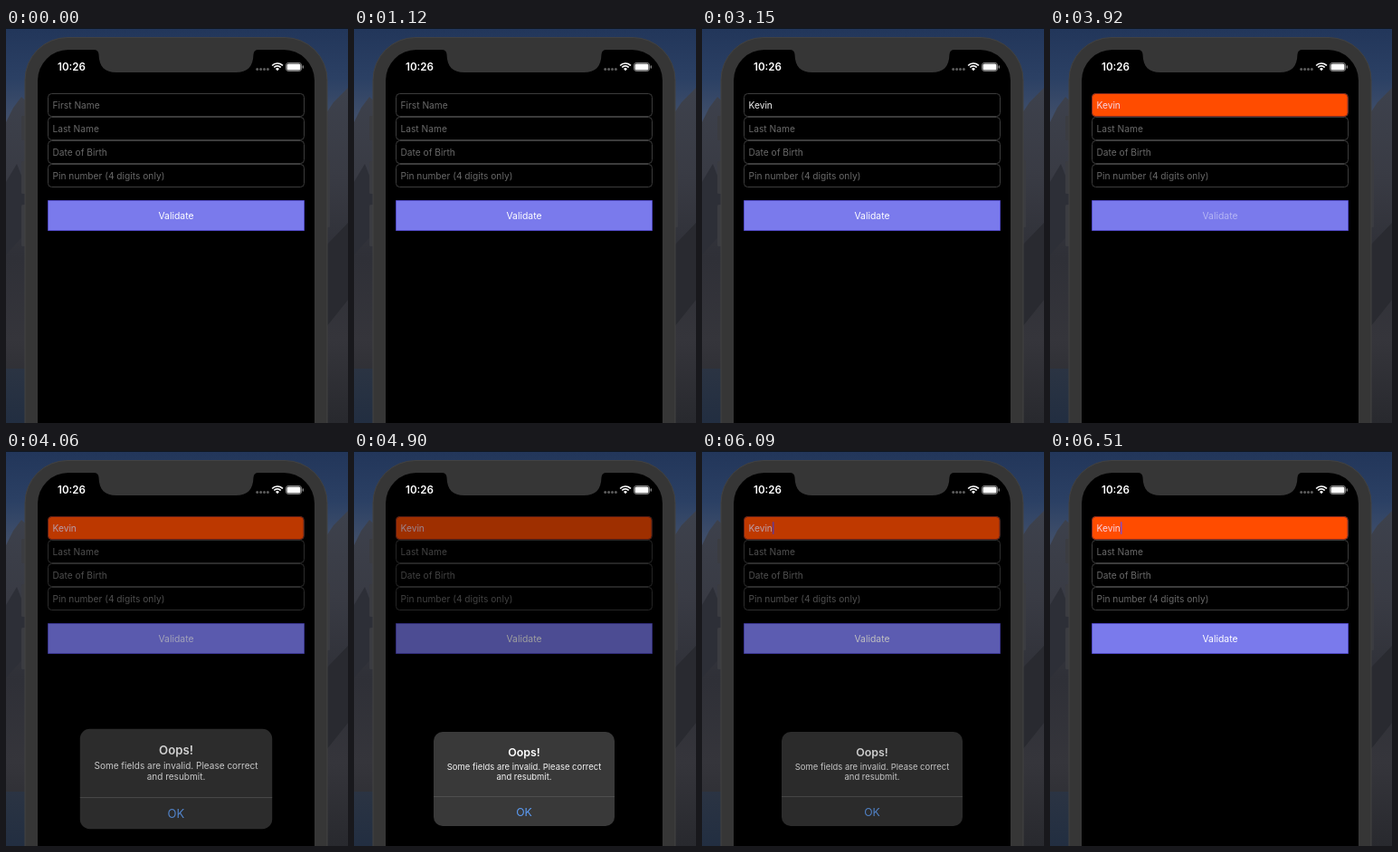
Animation of 378x436 px, one loop 6650 ms. Source, as an HTML page with a canvas:

```html
<!DOCTYPE html>
<html lang="en">
<head>
<meta charset="utf-8">
<title>Form validation</title>
<style>
html, body { margin: 0; width: 100%; height: 100%; overflow: hidden; background: #000; }
canvas { display: block; width: 378px; height: 436px; }
</style>
</head>
<body>
<canvas id="stage"></canvas>
<script>
const W = 378, H = 436, LOOP = 6650;
const FONT = 'Inter, Roboto, sans-serif';
const canvas = document.getElementById('stage');
const ctx = canvas.getContext('2d');
const dpr = window.devicePixelRatio || 1;
canvas.width = W * dpr;
canvas.height = H * dpr;

const clamp = x => Math.max(0, Math.min(1, x));
const ramp = (t, a, b) => clamp((t - a) / (b - a));

// critically damped spring from 0 to 1
function spring(ms) {
  const x = Math.max(0, ms) * 0.01826;
  return 1 - (1 + x) * Math.exp(-x);
}

function rect(x, y, w, h, r, fill, stroke) {
  ctx.beginPath();
  ctx.roundRect(x, y, w, h, r);
  if (fill) { ctx.fillStyle = fill; ctx.fill(); }
  if (stroke) { ctx.strokeStyle = stroke; ctx.lineWidth = 1; ctx.stroke(); }
}

function poly(fill, ...pts) {
  ctx.beginPath();
  for (let i = 0; i < pts.length; i += 2) ctx.lineTo(pts[i], pts[i + 1]);
  ctx.fillStyle = fill;
  ctx.fill();
}

function label(str, x, y, size, color, weight = 400, align = 'left') {
  ctx.font = `${weight} ${size}px ${FONT}`;
  ctx.textAlign = align;
  ctx.fillStyle = color;
  ctx.fillText(str, x, y);
}

function gradient(y0, y1, ...colors) {
  const g = ctx.createLinearGradient(0, y0, 0, y1);
  colors.forEach((c, i) => g.addColorStop(i / (colors.length - 1), c));
  return g;
}

function drawBackdrop() {
  ctx.fillStyle = gradient(0, 110, '#22365a', '#2b4064', '#46536c');
  ctx.fillRect(0, 0, W, H);
  ctx.fillStyle = '#10161f';
  ctx.fillRect(0, 0, W, 1);
  const rock = gradient(70, 436, '#3d414c', '#393b44', '#2f3037', '#35353b', '#28292e');
  poly(rock, 0, 104, 8, 88, 17, 76, 26, 84, 26, 380, 0, 380);
  poly(rock, 350, 100, 362, 82, 378, 66, 378, 436, 350, 436);
  poly('#2d2f37', 0, 170, 12, 150, 22, 176, 22, 226, 0, 250);
  poly('#292a30', 354, 240, 378, 215, 378, 300, 354, 330);
  ctx.fillStyle = gradient(376, 436, '#2b3443', '#222e41');
  ctx.fillRect(0, 376, 30, 60);
}

function drawPhone() {
  [[17, 97, 27], [17, 147, 36], [17, 195, 46], [353, 146, 74]]
    .forEach(([x, y, h]) => rect(x, y, 5, h, 1.5, '#3b3c41'));
  rect(21, 10.5, 334, 520, 47, '#363636', '#424242');
  rect(35, 24, 306, 500, 34, '#000');
}

function drawNotch() {
  ctx.beginPath();
  ctx.moveTo(97, 23);
  ctx.lineTo(97, 24);
  ctx.quadraticCurveTo(102, 24, 102.5, 29);
  ctx.bezierCurveTo(103, 43, 109, 49, 122, 49);
  ctx.lineTo(254, 49);
  ctx.bezierCurveTo(267, 49, 273, 43, 273.5, 29);
  ctx.quadraticCurveTo(274, 24, 279, 24);
  ctx.lineTo(279, 23);
  ctx.fillStyle = '#363636';
  ctx.fill();
}

function drawStatus() {
  label('10:26', 57, 47, 11.6, '#fff', 600);
  for (let i = 0; i < 4; i++) rect(276.2 + i * 3.9, 44, 3, 3, 1.5, '#5c5c5c');
  ctx.strokeStyle = ctx.fillStyle = '#fff';
  ctx.lineWidth = 1.7;
  [8, 5.1].forEach(r => {
    ctx.beginPath();
    ctx.arc(300, 47, r, -Math.PI * 0.76, -Math.PI * 0.24);
    ctx.stroke();
  });
  ctx.beginPath();
  ctx.moveTo(300, 47.3);
  ctx.arc(300, 47, 2.8, -Math.PI * 0.76, -Math.PI * 0.24);
  ctx.fill();
  rect(309.5, 38.5, 17, 9, 2.6, null, '#858585');
  rect(310.5, 39.5, 15, 7, 1.6, '#fff');
  rect(327.6, 41.3, 1.4, 3.4, 0.7, '#858585');
}

function typedName(t) {
  if (t < 1960) return '';
  if (t < 2170) return 'K';
  if (t < 2310) return 'Ke';
  return t < 2450 ? 'Kevi' : 'Kevin';
}

function caretAlpha(t) {
  if (t < 1610) return 0;
  if (t < 3920) return 1 - ramp(t, 2870, 3150) + ramp(t, 3360, 3500);
  return 0.75 * ramp(t, 6000, 6090);
}

function drawForm(t) {
  const invalid = t >= 3920;
  const hints = ['First Name', 'Last Name', 'Date of Birth', 'Pin number (4 digits only)'];
  const name = typedName(t);
  hints.forEach((hint, i) => {
    const y = 72 + i * 26, typed = i === 0 && name;
    rect(46.5, y + 0.5, 283, 25, 4, '#000', '#3c3c3c');
    if (invalid && i === 0) rect(46.5, y + 0.5, 282.5, 25, 4, '#ff4c00', '#8a2a1c');
    label(typed || hint, 51.5, y + 17, 10.2, typed ? (invalid ? '#f8d6e6' : '#f4f4f4') : '#696969');
  });

  ctx.font = `400 10.2px ${FONT}`;
  const x = 51.5 + ctx.measureText(name).width;
  ctx.globalAlpha = caretAlpha(t);
  rect(x, 78, 1.7, 14, 0.8, invalid ? '#6a4cf0' : '#7c7cf4');
  ctx.globalAlpha = 1;

  rect(46.5, 190.5, 283, 33, 0, '#7a7aec', '#5049c4');
  ctx.globalAlpha = 1 - 0.55 * (ramp(t, 3680, 3780) - ramp(t, 3930, 4180));
  label('Validate', 188, 211, 10.4, '#fff', 400, 'center');
  ctx.globalAlpha = 1;
}

function drawAlert(t) {
  const shown = spring(t - 3930), left = 1 - spring(t - 6025);
  const alpha = shown * left;
  if (alpha < 0.004) return;

  ctx.fillStyle = `rgba(0,0,0,${0.38 * alpha})`;
  ctx.fillRect(36, 60, 304, H - 60);

  ctx.save();
  const s = 1.2 - 0.2 * shown;
  ctx.translate(188, 362);
  ctx.scale(s, s);
  ctx.translate(-188, -362);
  ctx.globalAlpha = Math.pow(alpha, 0.65);
  rect(88, 310, 200, 104, 10, '#393939');
  ctx.fillStyle = '#565656';
  ctx.fillRect(88, 381, 200, 0.8);
  label('Oops!', 188, 336.5, 12.4, '#fff', 600, 'center');
  label('Some fields are invalid. Please correct', 188, 352, 9.45, '#f4f4f4', 400, 'center');
  label('and resubmit.', 188, 363, 9.45, '#f4f4f4', 400, 'center');
  label('OK', 188, 402.5, 12.3, '#5c9cf5', 400, 'center');
  ctx.restore();
}

function draw(t) {
  ctx.setTransform(dpr, 0, 0, dpr, 0, 0);
  drawBackdrop();
  drawPhone();
  drawForm(t);
  drawAlert(t);
  drawNotch();
  drawStatus();
}

const start = performance.now();
function tick() {
  draw((performance.now() - start) % LOOP);
  requestAnimationFrame(tick);
}
tick();
</script>
</body>
</html>
```
